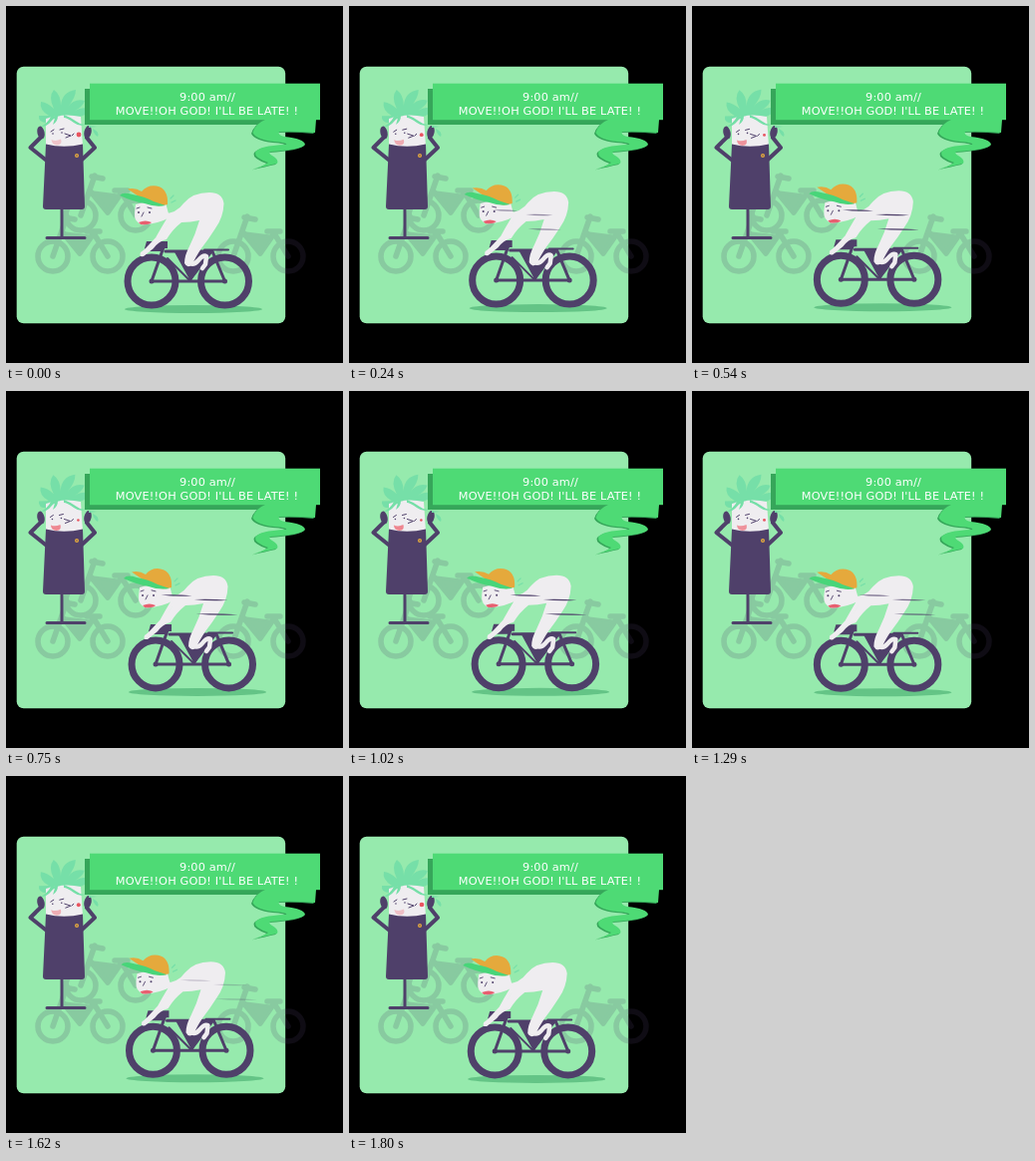
Write an HTML page that moves like this. It is 338 px wide and 358 px high and loops after 1.83 s.

```html
<!DOCTYPE html>
<html lang="en">
<head>
<meta charset="utf-8">
<title>Late ride</title>
<style>
  html, body { margin: 0; width: 100%; height: 100%; overflow: hidden; background: #000; }
  svg { display: block; width: 338px; height: 358px; }
  text { font: 11.3px "DejaVu Sans", sans-serif; fill: #fff; text-anchor: middle; letter-spacing: .15px; }
  .dark { fill: #4f406a; }
  .line { fill: none; stroke: #4f406a; stroke-linecap: round; stroke-linejoin: round; }
  .skin { fill: #efedf0; }
  .limb { fill: none; stroke: #efedf0; stroke-linecap: round; stroke-linejoin: round; }
  .mint { fill: #76dfa8; }
</style>
</head>
<body>
<svg viewBox="0 0 338 358">
  <defs>
    <g id="parked" class="line" stroke-width="5.5">
      <circle r="15"/>
      <circle cx="55" r="15"/>
      <path d="M0 0 14 -40M11 -39 22 -37M9 -25 27 -3 41 -23 55 0M34 -25H47"/>
      <path class="dark" stroke-width="3" d="M13 -23 37 -20 27 -5Z"/>
    </g>
    <path id="tail" d="M260 114H311L310 127Q290 125 274 126Q272 129 279 131Q299 133 300 139Q297 144 265 146Q263 148 267 150Q274 154 272 158Q262 160 248 163.500Q259 160 263 157Q249 152 250 147Q253 140 281 139Q283 137 269 136Q251 134 247.500 127Q250 118 260 114Z"/>
  </defs>

  <rect x="10.700" y="60.700" width="269.500" height="257.500" rx="7" fill="#96eaad"/>

  <g opacity=".19">
    <use href="#parked" x="47" y="251"/>
    <use href="#parked" x="75" y="210"/>
    <use href="#parked" x="228" y="251"/>
  </g>

  <!-- coat stand -->
  <path class="line" stroke-width="3" stroke-linecap="butt" d="M56 203V232M41 232.500H79"/>
  <path class="line" stroke-width="4" d="M42 156 24.500 142 34.500 132M74 156 89 142 81 132"/>
  <ellipse class="dark" cx="35" cy="127" rx="3.600" ry="6.500" transform="rotate(-12 35 127)"/>
  <ellipse class="dark" cx="82" cy="126.500" rx="3.600" ry="6.500" transform="rotate(12 82 126.500)"/>
  <path class="mint" id="hair" d="M41 117Q32 117 33 110Q37 110 43 110Q33 104 35 96Q42 97 48 103Q42 91 48 84Q55 89 55 100Q56 86 70 84Q70 92 62 101Q69 92 79 95Q77 101 69 105Q80 99 85 106Q78 110 74 111L75 117Z"/>
  <path class="skin" d="M40 113Q58 107 75 111L77 141H40Z"/>
  <path class="dark" d="M40 138.500Q58 143 77 138.500L79 201Q79 204 76 204H40Q37 204 37 201Z"/>
  <circle cx="71" cy="150" r="2" fill="#e5a93c"/>
  <circle class="dark" cx="71" cy="150" r=".7"/>
  <path class="mint" id="fringe" d="M55 110Q49 111 45 116T35 121Q42 117 45 111ZM58 109Q66 112 71 116T81 118Q75 122 68 117T58 112ZM52 110Q52 116 47 119Q49 114 49 110Z"/>
  <g id="face">
    <path class="line" stroke-width="1" d="M45 126l3 -2M54 124l4 -1M59 128l6 2 -5 2M66 130l2 -2"/>
    <circle class="dark" cx="47" cy="128" r=".8"/>
    <circle class="dark" cx="56" cy="127" r=".8"/>
    <circle id="blush" cx="73" cy="129" r="2.400" fill="#e8545f"/>
    <path id="mouth" fill="#ee858f" d="M45.500 134Q50 136 55 133.500Q57 139 51 139.500Q46 139 45.500 134Z"/>
  </g>
  <path class="mint" d="M83 120l8 1 -8 1zM87 123q7 3 5 8q-4 -2 -5 -8z"/>

  <!-- rider -->
  <g id="rider">
    <ellipse cx="188" cy="304" rx="69" ry="4" fill="#64c486"/>
    <g class="line">
      <circle cx="146" cy="276" r="24" stroke-width="7"/>
      <circle cx="219.500" cy="276" r="24" stroke-width="7"/>
      <path stroke-width="3" d="M146 276 158 242M146 276H219.500M160 246H207M207 246 219.500 276M184 275 206 246"/>
      <path stroke-width="2" d="M162 253 184 275M199 244.500H223"/>
    </g>
    <path class="dark" d="M168 245H205L185 276ZM141 236H162V243H158L156 246H142L139 243Z"/>
    <circle class="dark" cx="146" cy="276" r="2.500"/>
    <circle class="dark" cx="219.500" cy="276" r="2.500"/>

    <!-- far limbs, shin, then torso with thigh -->
    <path class="limb" stroke-width="4" d="M163 214Q157 224 152 233L138 248"/>
    <path class="limb" stroke-width="4.500" d="M182 257Q188 261 193 255T201 251L200 259 197 263"/>
    <path class="skin" d="M158 208Q171 208 178 198Q187 187 204 187Q217 187 218.500 198Q218 212 210 223Q203 234 196 243Q190 252 187 259Q182 264 179 258Q179 250 184 241Q190 229 194 215Q185 217 176 217Q167 224 161 234Q153 236 148 243L138 251Q133 252 135 247Q146 240 154 231Q160 223 163 217Z"/>

    <path class="skin" d="M130 199Q145 194 160 197L164 212Q154 218 137 219.500Q128 217 129 207Z"/>
    <path class="line" stroke-width=".9" d="M131 203l3 -1M142 202l4 1M138 207l-2 4"/>
    <circle class="dark" cx="133" cy="207" r="1"/>
    <circle class="dark" cx="144" cy="207" r="1"/>
    <path fill="#e85f70" d="M133 217Q140 214 146 217Q143 220 135 219Z"/>
    <path fill="#e5a93c" d="M122 183.500Q130 182 136 186Q142 179 151 180.500Q163 183 162 199Q149 203 139 195Z"/>
    <path fill="#48d579" d="M114 190Q117 186 127 189Q139 191 148 196L160 200Q150 202 139 198Q127 196 114 190Z"/>
    <path fill="none" stroke="#76dfa8" stroke-width="1.200" stroke-linecap="round" d="M165 193l3 -3M166 197l4 -2"/>
  </g>
  <g id="wind" class="dark"></g>

  <!-- banner -->
  <path fill="#36a65a" d="M79 83H309V119H79Z"/>
  <use href="#tail" x="-1.500" y="1" fill="#36a65a"/>
  <use href="#tail" fill="#4eda75"/>
  <rect x="84" y="77.700" width="231" height="36.500" fill="#4eda75"/>
  <text x="202" y="94.500">9:00 am//</text>
  <text x="201.500" y="108.500">MOVE!!OH GOD! I'LL BE LATE! !</text>
</svg>
<script>
  const LOOP = 1830, STEP = 30;
  const $ = id => document.getElementById(id);
  const clamp = v => Math.max(0, Math.min(1, v));

  // start x, y, length
  const gusts = [[139, 205, 31], [172, 209.5, 34], [174, 224, 42]].map(([x, y, len]) => {
    const path = document.createElementNS("http://www.w3.org/2000/svg", "path");
    $("wind").append(path);
    return { path, x, y, len };
  });

  function draw(t) {
    const sway = Math.sin(Math.PI * t / LOOP);
    $("rider").setAttribute("transform", `translate(${4.2 * sway} ${-2.2 * sway})`);

    $("face").setAttribute("transform", `translate(${-.6 * sway} ${.5 * sway})`);
    $("hair").setAttribute("transform", `rotate(${-1.2 * sway} 58 114)`);
    $("blush").setAttribute("r", 2.4 - 1.2 * sway);
    $("mouth").setAttribute("opacity", .4 + .6 * sway);

    const grow = clamp(t / 480);
    const fade = clamp(t / 420) * clamp((1800 - t) / 700);
    $("wind").setAttribute("opacity", fade);
    for (const { path, x, y, len } of gusts) {
      const w = len * (.6 + .4 * grow);
      const left = x + .022 * t;
      const mid = left + w / 2;
      path.setAttribute("d", `M${left} ${y - .5}Q${mid} ${y - 1.3} ${left + w} ${y + .3}Q${mid} ${y + 1.6} ${left} ${y - .5}Z`);
    }
  }

  const start = performance.now();
  function tick() {
    const t = (performance.now() - start) % LOOP;
    draw(Math.floor(t / STEP) * STEP);
    requestAnimationFrame(tick);
  }
  draw(0);
  requestAnimationFrame(tick);
</script>
</body>
</html>
```
